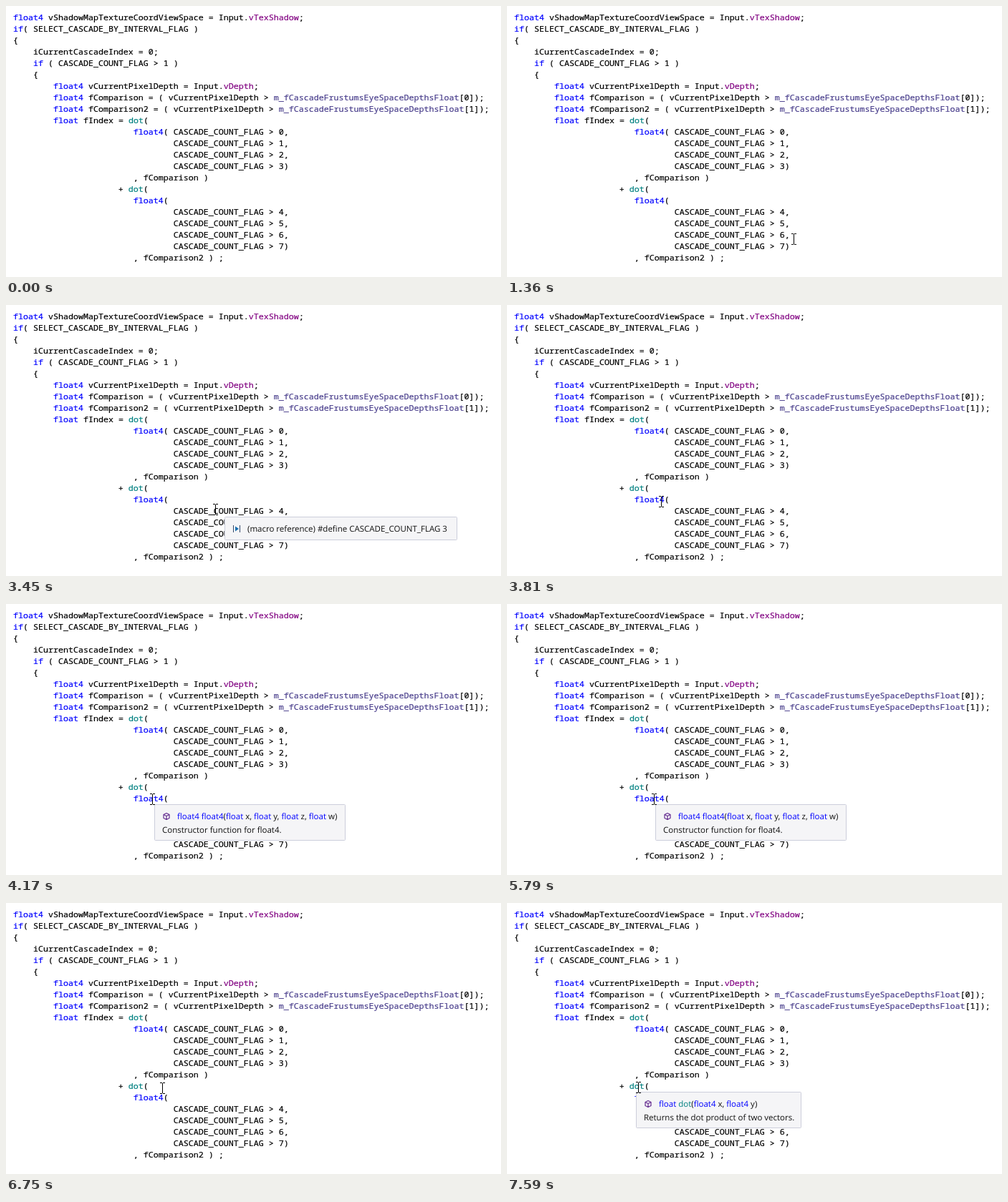
Write an HTML page that moves like this. It is 691 by 379 pixels and loops after 8000 ms.

```html
<!DOCTYPE html>
<html lang="en">
<head>
<meta charset="utf-8">
<title>Shader code hints</title>
<style>
html, body { margin: 0; width: 100%; height: 100%; overflow: hidden; background: #fff; }
pre {
  position: absolute; left: 10px; top: 8px; margin: 0; color: #000;
  font: 11.6667px/16px "Noto Sans Mono", "DejaVu Sans Mono", monospace;
  font-variant-ligatures: none; -webkit-text-stroke: .2px;
}
svg { position: absolute; left: 0; top: 0; }
svg text {
  font: 11.5px "Open Sans", "Noto Sans", sans-serif; fill: #111;
  white-space: pre; text-rendering: geometricPrecision;
}
.box { fill: #f5f5f7; stroke: #cccedb; }
.key { color: #00f; fill: #00f; }
.func { color: #008080; fill: #008080; }
.member { color: #800080; }
.global { color: #483d8b; }
</style>
</head>
<body>
<pre id="code">float4 vShadowMapTextureCoordViewSpace = Input.vTexShadow;
if( SELECT_CASCADE_BY_INTERVAL_FLAG )
{
    iCurrentCascadeIndex = 0;
    if ( CASCADE_COUNT_FLAG > 1 )
    {
        float4 vCurrentPixelDepth = Input.vDepth;
        float4 fComparison = ( vCurrentPixelDepth > m_fCascadeFrustumsEyeSpaceDepthsFloat[0]);
        float4 fComparison2 = ( vCurrentPixelDepth > m_fCascadeFrustumsEyeSpaceDepthsFloat[1]);
        float fIndex = dot(
                        float4( CASCADE_COUNT_FLAG > 0,
                                CASCADE_COUNT_FLAG > 1,
                                CASCADE_COUNT_FLAG > 2,
                                CASCADE_COUNT_FLAG > 3)
                        , fComparison )
                     + dot(
                        float4(
                                CASCADE_COUNT_FLAG > 4,
                                CASCADE_COUNT_FLAG > 5,
                                CASCADE_COUNT_FLAG > 6,
                                CASCADE_COUNT_FLAG > 7)
                        , fComparison2 ) ;</pre>
<svg width="691" height="379">
  <defs>
    <path id="cube" fill="none" stroke="#652d90" stroke-width="1.2" stroke-linejoin="round"
      d="M17 12.5l4 2v5l-4 2-4-2v-5zM13 14.5l4 2 4-2M17 16.5v5"/>
  </defs>
  <g class="tip" data-from="2080" data-to="3570" transform="translate(305 296)">
    <rect class="box" x=".5" y=".5" width="324" height="32" rx="1"/>
    <path d="M12.5 12v10M21.5 12v10" stroke="#35496a"/>
    <path d="M15 13.5l5 3.5-5 3.5z" fill="#1a6fb0"/>
    <text x="32" y="21">(macro reference) #define CASCADE_COUNT_FLAG 3</text>
  </g>
  <g class="tip" data-from="4170" data-to="6030" transform="translate(207 280)">
    <rect class="box" x=".5" y=".5" width="266" height="50" rx="1"/>
    <use href="#cube"/>
    <text class="sig" x="32" y="21">float4 float4(float x, float y, float z, float w)</text>
    <text x="11" y="40">Constructor function for float4.</text>
  </g>
  <g class="tip" data-from="7410" data-to="8000" transform="translate(180 264)">
    <rect class="box" x=".5" y=".5" width="230" height="50" rx="1"/>
    <use href="#cube"/>
    <text class="sig" x="32" y="21">float dot(float4 x, float4 y)</text>
    <text x="11" y="40">Returns the dot product of two vectors.</text>
  </g>
  <path id="cursor" fill="none" stroke="#000"
    d="M-3 -7.5h3M1 -7.5h3M.5 -7v14M-3 7.5h3M1 7.5h3"/>
</svg>
<script>
const LOOP = 8000, STEP = 60;

const smooth = k => k * k * (3 - 2 * k);
const easeOut = k => 1 - (1 - k) ** 3;

// The cursor glides from place to place in steps.
const glides = [
  { start: 520, end: 2080, from: [516, 378], to: [308, 285], ease: smooth },
  { start: 3450, end: 4170, from: [292, 286], to: [204, 273], ease: easeOut },
  { start: 5790, end: 6510, from: [205, 273], to: [238, 258], ease: smooth },
  { start: 6510, end: 7170, from: [238, 258], to: [173, 260], ease: smooth },
  { start: 7170, end: 7410, from: [173, 260], to: [183, 260], ease: smooth },
  { start: 7410, end: 7590, from: [183, 260], to: [183, 258], ease: smooth }
];

const classOf = word =>
  /^(float4?|if)$/.test(word) ? "key" :
  word === "dot" ? "func" :
  /^m_/.test(word) ? "global" :
  /^(vTexShadow|vDepth)$/.test(word) ? "member" : "";

function paint(el, tag) {
  el.innerHTML = el.innerHTML.replace(/(?<![&\w])\w+/g, word => {
    const name = classOf(word);
    return name ? `<${tag} class="${name}">${word}</${tag}>` : word;
  });
}

paint(document.getElementById("code"), "span");
document.querySelectorAll(".sig").forEach(el => paint(el, "tspan"));

const cursor = document.getElementById("cursor");
const tips = document.querySelectorAll(".tip");
const show = (el, on) => { el.style.display = on ? "" : "none"; };

function place({ start, end, from, to, ease }, t) {
  const passed = Math.floor((t - start) / STEP) * STEP;
  const k = ease(Math.min(1, passed / (end - start)));
  return from.map((a, i) => Math.round(a + (to[i] - a) * k));
}

function draw(t) {
  const glide = glides.findLast(g => g.start <= t);
  show(cursor, glide);
  if (glide) cursor.setAttribute("transform", `translate(${place(glide, t)})`);
  tips.forEach(tip => show(tip, t >= tip.dataset.from && t < tip.dataset.to));
}

const began = performance.now();
function tick() {
  draw((performance.now() - began) % LOOP);
  requestAnimationFrame(tick);
}
tick();
</script>
</body>
</html>
```
